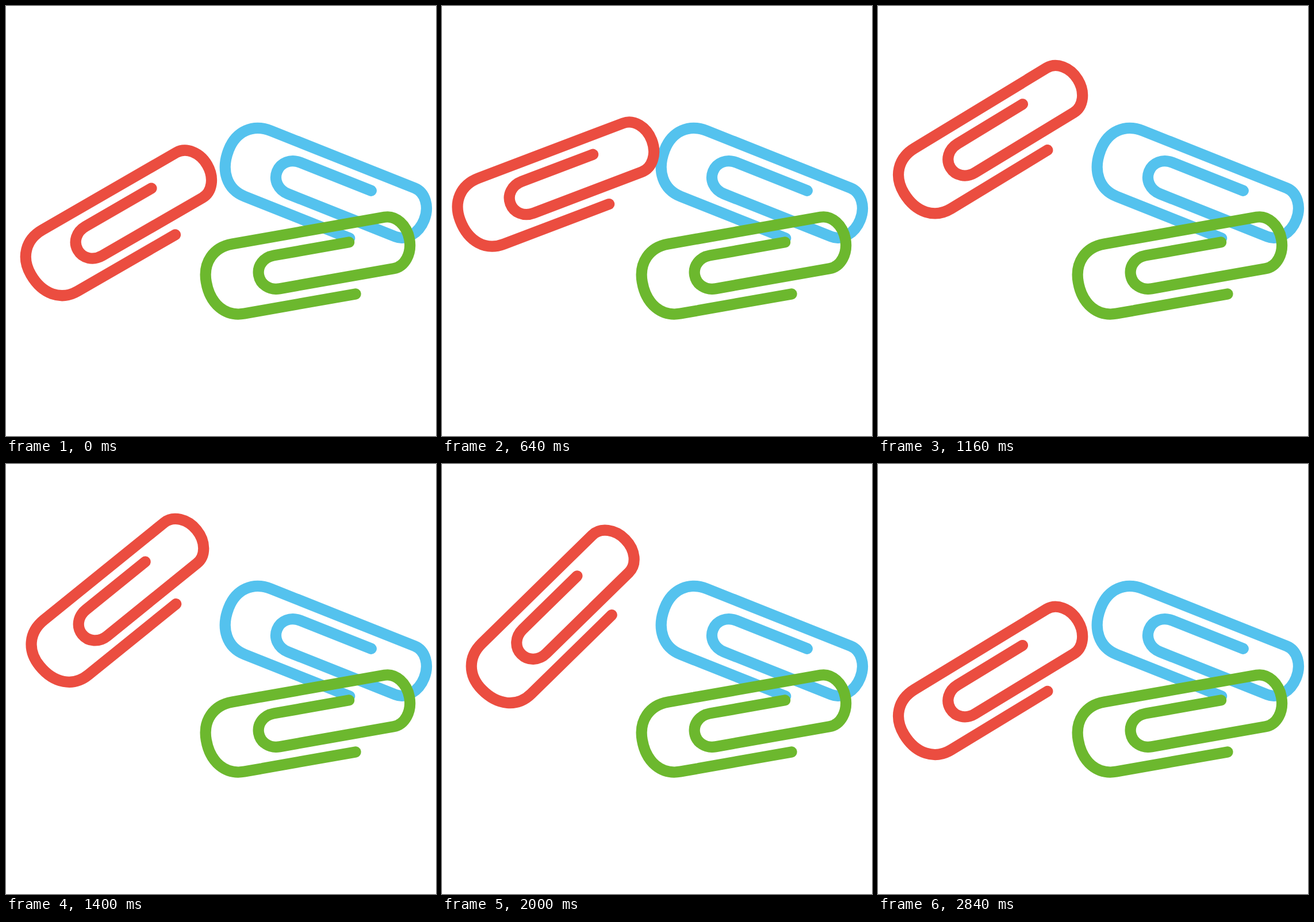
An HTML page for the animation above (2880 ms loop, 748 by 748 pixels).

```html
<!DOCTYPE html>
<html lang="en">
<head>
<meta charset="utf-8">
<title>Paper clips</title>
<style>
  html, body { margin: 0; width: 100%; height: 100%; overflow: hidden; background: #fff; }
  svg { display: block; width: 100%; height: 100%; }
  use { fill: none; stroke-width: 19.2; stroke-linecap: round; }
</style>
</head>
<body>
<svg viewBox="0 0 748 748">
  <defs>
    <path id="clip" d="M78.2 63.5 H-118
      C-151.6 63.5 -174 37.3 -174 -2 C-174 -36.5 -151.6 -59.4 -118 -59.4
      H151 C171 -59.4 187 -39 187 -14 C187 11.5 171 31.5 151 31.5
      H-50 C-68.2 31.5 -82 18.6 -82 2 C-82 -14.5 -68.2 -27.2 -50 -27.2 H82.6"/>
  </defs>
  <use href="#clip" stroke="#54c2ee" transform="translate(548.5 316) rotate(21.7)"/>
  <use href="#clip" stroke="#6cb82e" transform="translate(520 452) rotate(-10)"/>
  <use href="#clip" stroke="#eb4d40" id="red"/>
</svg>
<script>
const LOOP = 2880, STEP = 40;
const red = document.getElementById('red');

// [time, value] keys; the clip lifts, rocks at the top and sinks back
const height = [[0, 382], [240, 377], [400, 364], [560, 339], [640, 313], [800, 269],
  [960, 244], [1080, 237], [1160, 237], [1260, 237], [1500, 247], [1680, 240],
  [2000, 272], [2240, 310], [2400, 337.6], [2600, 366], [2760, 380]];
const angle = [[0, -30], [160, -25.7], [360, -22.8], [560, -21.7], [640, -20.8], [720, -20],
  [1040, -34.5], [1160, -31.3], [1260, -23.5], [1500, -48.3], [1680, -41.4], [2000, -44.4],
  [2240, -46.5], [2400, -48], [2600, -41], [2800, -32.6], [2840, -31.3]];

// Smooth cyclic curve through the keys, without overshoot
function sample(keys, t) {
  const n = keys.length;
  const key = i => {
    const [time, value] = keys[(i + n) % n];
    return [time + LOOP * Math.floor(i / n), value];
  };
  const slope = i => {
    const [a, b] = [key(i), key(i + 1)];
    return (b[1] - a[1]) / (b[0] - a[0]);
  };
  const tangent = i => {
    const [p, q] = [slope(i - 1), slope(i)];
    return p * q > 0 ? 2 * p * q / (p + q) : 0;
  };
  let i = n - 1;
  while (keys[i][0] > t) i--;
  const [t0, v0] = key(i), [t1, v1] = key(i + 1);
  const d = t1 - t0, u = (t - t0) / d, w = 1 - u;
  return w * w * ((1 + 2 * u) * v0 + u * d * tangent(i))
    + u * u * ((1 + 2 * w) * v1 - w * d * tangent(i + 1));
}

function draw(now) {
  const t = Math.floor(now % LOOP / STEP) * STEP;
  red.setAttribute('transform',
    `translate(195 ${sample(height, t)}) rotate(${sample(angle, t)})`);
  requestAnimationFrame(draw);
}
draw(performance.now());
</script>
</body>
</html>
```
